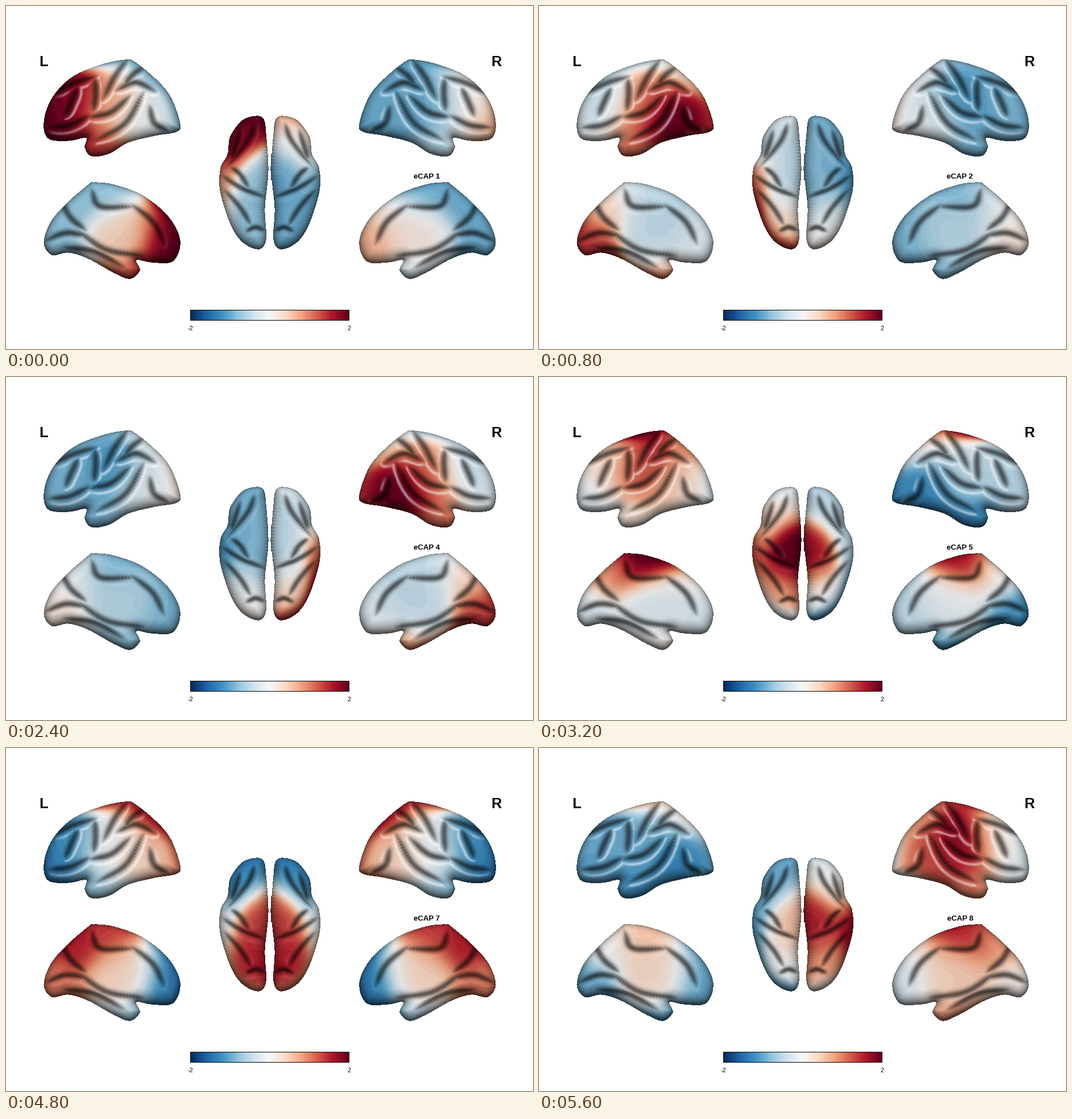
Write a matplotlib script that moves like this. It is 927x604 px and loops after 6.4 s.

```python
import numpy as np
import matplotlib.pyplot as plt
from matplotlib.animation import FuncAnimation
from matplotlib.path import Path

W, H, DPI = 927, 604, 100
CMAP = plt.get_cmap("RdBu_r", 64)

# Left hemisphere; the right one is its mirror image.
LATERAL = [
    (208, 95), (165, 104), (115, 126), (80, 163), (66, 205), (74, 234),
    (110, 238), (140, 233), (138, 250), (150, 265), (180, 261), (215, 241),
    (262, 229), (300, 222), (306, 207), (289, 160), (262, 128), (225, 98)]
MEDIAL = [
    (155, 310), (190, 314), (240, 333), (285, 370), (306, 413), (293, 449),
    (255, 451), (229, 447), (235, 465), (218, 480), (190, 470), (145, 445),
    (110, 434), (80, 438), (66, 416), (78, 380), (105, 348), (143, 315)]
TOP = [
    (440, 194), (453, 200), (457, 225), (461, 290), (455, 355), (457, 410),
    (444, 428), (415, 415), (394, 383), (376, 325), (377, 285), (389, 262),
    (394, 230), (415, 202)]

# Main sulci of each view.
LATERAL_FOLDS = [
    [(148, 198), (185, 189), (218, 160)],
    [(160, 238), (210, 208), (242, 153)],
    [(212, 97), (190, 128), (171, 166)],
    [(156, 130), (157, 158), (154, 186)],
    [(126, 146), (114, 172), (104, 196)],
    [(82, 155), (118, 138), (158, 126)],
    [(195, 150), (228, 137), (263, 153)],
    [(240, 110), (222, 124), (208, 142)],
    [(76, 216), (112, 212), (146, 195)],
    [(252, 178), (260, 208), (284, 222)]]
MEDIAL_FOLDS = [
    [(96, 343), (113, 374), (140, 396)],
    [(69, 414), (105, 401), (143, 406)],
    [(150, 324), (165, 354), (226, 354)],
    [(220, 350), (258, 382), (277, 420)],
    [(122, 394), (175, 430), (240, 441)],
    [(102, 426), (155, 434), (205, 460)]]
TOP_FOLDS = [
    [(437, 208), (425, 240), (388, 286)],
    [(412, 220), (403, 250), (396, 272)],
    [(379, 300), (414, 322), (456, 338)],
    [(396, 286), (412, 300), (427, 322)],
    [(383, 324), (411, 356), (431, 388)],
    [(422, 398), (438, 391), (454, 396)]]

# Region centres in pixels: from the front, from below, from the midline.
REGIONS = dict(
    front=(30, 60, 40), dlpfc=(55, 110, 65), central=(125, 160, 20),
    peri=(115, 95, 85), parietal=(185, 140, 30), tempor=(170, 60, 85),
    occ=(225, 60, 30), pole=(95, 15, 60), core=(105, 85, 0))


def activity(base, **known):
    """Value of every region, in tenths; unnamed regions take the base."""
    return np.array([known.get(name, base) for name in REGIONS]) / 10


left_front = (
    activity(-8, front=20, dlpfc=19, peri=7, tempor=0, pole=14, core=4),
    activity(-10, front=7, dlpfc=0, pole=-5, core=2))
left_back = (
    activity(-5, front=-2, peri=12, parietal=4, tempor=21, occ=14, pole=11),
    activity(-9, peri=-12, parietal=-1, tempor=-2, occ=2, core=-5))
right_front = (
    activity(-8, front=9, dlpfc=2, central=-15, parietal=-12, pole=0, core=2),
    activity(-3, front=19, dlpfc=18, central=-14, peri=7, parietal=-8,
             tempor=0, pole=16, core=3))
left_central = (
    activity(-3, central=22, peri=14, parietal=8, dlpfc=4, tempor=4, pole=2),
    activity(-5, central=18, parietal=0, tempor=-13, occ=-12, pole=-13,
             core=-1))
parietal = (
    activity(4, front=-14, dlpfc=-12, central=14, peri=0, parietal=16,
             occ=10, pole=-7),) * 2
right_central = (
    activity(-10, central=6, parietal=0, tempor=-13, pole=-12, core=4),
    activity(4, front=-3, dlpfc=1, central=16, peri=19, parietal=8,
             tempor=13, occ=1, pole=10))
states = [left_front, left_back, right_front, left_back[::-1], left_central,
          tuple(-side for side in parietal), parietal, right_central]


def spline(pts, closed=False, steps=12):
    """Catmull-Rom curve through the points."""
    p = np.array(pts, float)
    if closed:
        p = np.vstack([p[-1], p, p[:2]])
    else:
        p = np.vstack([2 * p[0] - p[1], p, 2 * p[-1] - p[-2]])
    t = np.linspace(0, 1, steps, endpoint=False)[:, None]
    out = []
    for a, b, c, d in zip(p, p[1:], p[2:], p[3:]):
        out.append(b + t * (c - a) / 2 + t**2 * (a - 2.5 * b + 2 * c - d / 2)
                   + t**3 * (1.5 * (b - c) + (d - a) / 2))
    out.append(p[-2:-1])
    return np.vstack(out)


def distance(x, y, curve, taper=0):
    """Distance to a curve; a taper makes its ends fade out."""
    ends = taper * np.abs(np.linspace(-1, 1, len(curve)))**4
    best = np.full(x.shape, 1e3)
    for (cx, cy), extra in zip(curve, ends):
        np.minimum(best, np.hypot(x - cx, y - cy) + extra, out=best)
    return best


def blur(a, times=3):
    for _ in range(times):
        p = np.pad(a, 1, mode="edge")
        a = (p[:-2, 1:-1] + p[2:, 1:-1] + p[1:-1, :-2] + p[1:-1, 2:]
             + 2 * a) / 6
    return a


def lateral_place(x, y, facing):
    return x - 66, 266 - y, 25 + 60 * facing


def medial_place(x, y, facing):
    return 307 - x, 480 - y, 20 * (1 - facing)


def top_place(x, y, facing):
    along, side = y - 192, 461 - x
    height = 165 * np.sqrt(np.clip(1 - ((along - 120) / 135)**2, 0, 1))
    return along, height - 70 * (side / 85)**2, side


class View:
    """One hemisphere seen from one side."""

    def __init__(self, outline, folds, place, flip, gloss, fold_width=4.5):
        edge = spline(outline, closed=True)
        self.x0, self.y0 = np.floor(edge.min(0)).astype(int) - 3
        self.x1, self.y1 = np.ceil(edge.max(0)).astype(int) + 4
        y, x = np.mgrid[self.y0:self.y1, self.x0:self.x1].astype(float)
        inside = Path(edge).contains_points(np.c_[x.ravel(), y.ravel()])
        self.mask, self.flip = inside.reshape(x.shape), flip

        # Rounded body lit from above.
        depth = np.where(self.mask, distance(x, y, edge), 0)
        t = np.clip(depth / 26, 0, 1)
        facing = blur(np.sqrt(1 - (1 - t)**2))
        up = np.gradient(depth, axis=0) * (1 - t)
        light = blur(np.clip(.93 * facing + .42 * up, 0, 1))

        # Dark sulci, with a lit bank and a glossy crest on one side.
        gap = blur(np.min([distance(x, y, spline(f), taper=6)
                           for f in folds], axis=0))
        dark = np.exp(-(gap / fold_width)**2 / 2)
        dy, dx = np.gradient(gap)
        bank = -np.gradient(dark, axis=0)
        crest = np.exp(-((gap - 11) / 2.6)**2) * np.clip(dx + dy, 0, 1)
        shade = (.3 + .67 * light) * (1 - .58 * dark) + 1.3 * bank * facing
        self.shade = np.clip(shade, .06, 1)[..., None]
        self.shine = blur(gloss * crest * facing**3, 1)[..., None]

        spots = np.array(place(x, y, facing))
        power = np.array([-((spots - np.reshape(c, (3, 1, 1)))**2).sum(0)
                          for c in REGIONS.values()]) / (2 * 30**2)
        weight = np.exp(power - power.max(0))
        self.weight = weight / weight.sum(0)

    def paint(self, canvas, values):
        field = np.tensordot(values, self.weight, 1)
        rgb = CMAP(np.clip((field + 2) / 4, 0, 1))[..., :3]
        rgb = rgb * self.shade * (1 - self.shine) + self.shine
        mask, cols = self.mask, slice(self.x0, self.x1)
        if self.flip:
            rgb, mask = rgb[:, ::-1], mask[:, ::-1]
            cols = slice(W - self.x1, W - self.x0)
        area = canvas[self.y0:self.y1, cols]
        area[mask] = rgb[mask]


def hemisphere(flip):
    return [View(LATERAL, LATERAL_FOLDS, lateral_place, flip, .55),
            View(MEDIAL, MEDIAL_FOLDS, medial_place, flip, .08),
            View(TOP, TOP_FOLDS, top_place, flip, .12, fold_width=3.8)]


sides = [hemisphere(False), hemisphere(True)]


def render(state):
    canvas = np.ones((H, W, 3))
    for views, values in zip(sides, state):
        for view in views:
            view.paint(canvas, values)
    canvas[535:554, 324:603] = 0
    canvas[536:553, 325:602] = CMAP(np.linspace(0, .9999, 277))[:, :3]
    return canvas


pictures = [render(s) for s in states]

plt.rcParams["font.family"] = "Liberation Sans"
fig = plt.figure(figsize=((W + .01) / DPI, (H + .01) / DPI), dpi=DPI,
                 facecolor="white")
ax = fig.add_axes([0, 0, 1, 1])
ax.axis("off")
image = ax.imshow(pictures[0], interpolation="nearest", aspect="auto")


def label(x, y, text, px, weight="normal"):
    return ax.text(x, y, text, fontsize=px * 72 / DPI, weight=weight,
                   ha="center", va="baseline")


label(65.5, 105, "L", 25.5, "bold")
label(861.5, 105, "R", 25.5, "bold")
label(324, 570, "-2", 10.7)
label(602.5, 570, "2", 10.7)
title = label(740, 303, "eCAP 1", 13.3, "bold")


def update(i):
    image.set_data(pictures[i])
    title.set_text(f"eCAP {i + 1}")
    return image, title


anim = FuncAnimation(fig, update, frames=len(states), interval=800,
                     repeat=True, repeat_delay=0)
plt.show()
```
